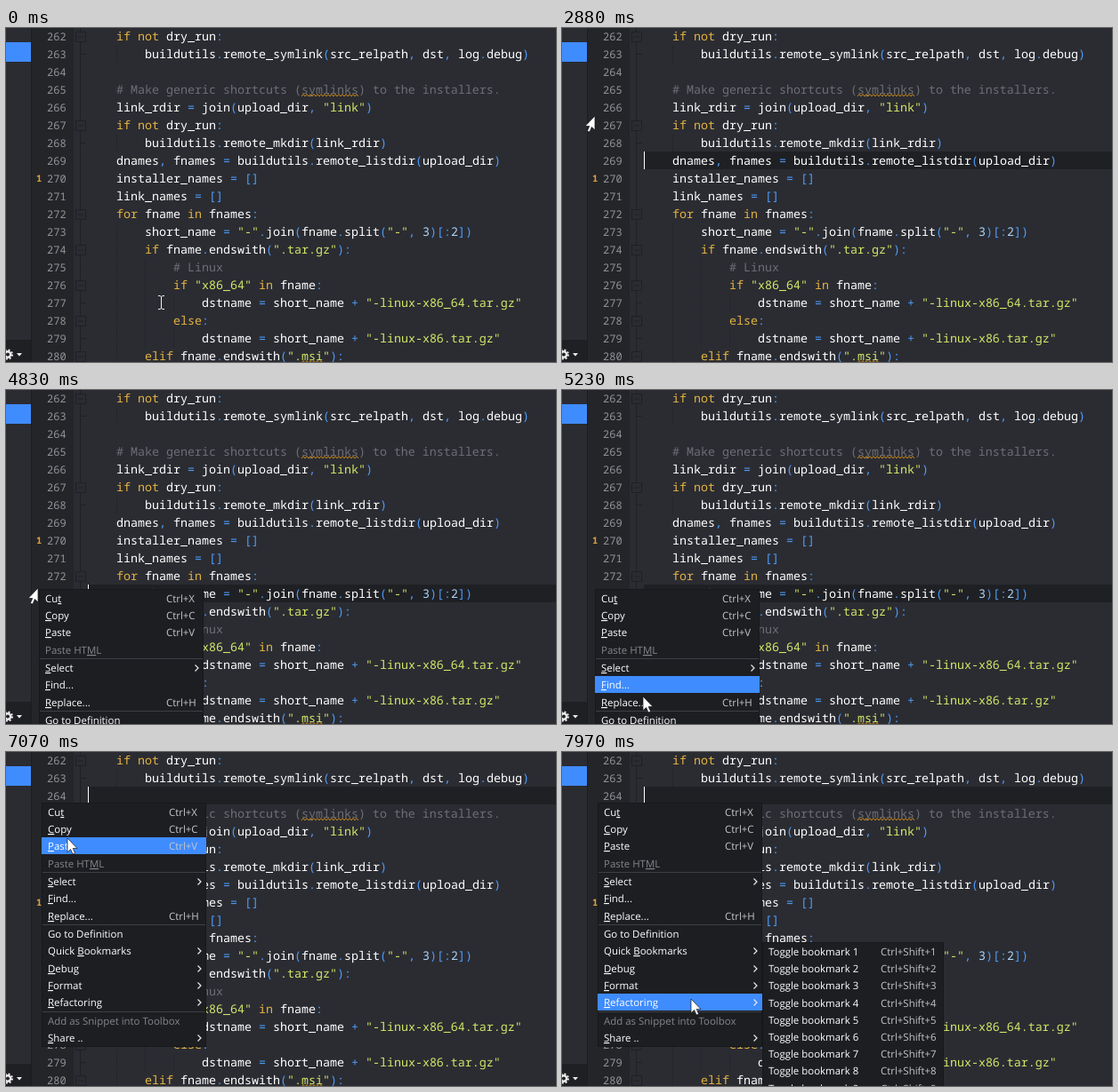
Write an HTML page that moves like this. It is 618 px wide and 376 px high and loops after 8000 ms.

```html
<!DOCTYPE html>
<html lang="en">
<head>
<meta charset="utf-8">
<title>Code editor</title>
<style>
html, body { margin: 0; width: 100%; height: 100%; overflow: hidden; background: #2b2c32; }
svg { display: block; width: 618px; height: 376px; }
text { white-space: pre; text-rendering: geometricPrecision; }
.code { font: 13.3333px "Noto Sans Mono", monospace; fill: #fff; }
.num { font-size: 12px; fill: #929398; }
.kw { fill: #e3b341; }
.op { fill: #4d9dfb; }
.str { fill: #d3e667; }
.int { fill: #a9d4fb; }
.com { fill: #6c6e75; }
.ui { font: 11.45px "Open Sans", "Noto Sans", sans-serif; fill: #fff; }
.key { fill: #c6c6ca; }
.off { fill: #85858b; }
.u { text-decoration: underline; }
.fold { fill: none; stroke: #1f2024; }
.wave { fill: none; stroke: #c58a1c; }
</style>
</head>
<body>
<svg id="stage" viewBox="0 0 618 376"></svg>
<script>
const LOOP = 8000, TICK = 130;
const LEFT = 92, CHAR = 8, LINE = 20, FIRST = 262;
const ROW = 19.2, RULE = 1.4;
const stage = document.getElementById('stage');

function add(parent, tag, attrs = {}, text) {
  const el = document.createElementNS('http://www.w3.org/2000/svg', tag);
  for (const k in attrs) el.setAttribute(k, attrs[k]);
  if (text !== undefined) el.textContent = text;
  parent.appendChild(el);
  return el;
}
const rect = (p, x, y, width, height, fill) => add(p, 'rect', { x, y, width, height, fill });
const path = (p, d, attrs) => add(p, 'path', { d, ...attrs });
const show = (el, on) => { el.style.display = on ? '' : 'none'; };
const place = (el, x, y, extra = '') => el.setAttribute('transform', `translate(${x} ${y})${extra}`);

const CODE = `    if not dry_run:
        buildutils.remote_symlink(src_relpath, dst, log.debug)

    # Make generic shortcuts (symlinks) to the installers.
    link_rdir = join(upload_dir, "link")
    if not dry_run:
        buildutils.remote_mkdir(link_rdir)
    dnames, fnames = buildutils.remote_listdir(upload_dir)
    installer_names = []
    link_names = []
    for fname in fnames:
        short_name = "-".join(fname.split("-", 3)[:2])
        if fname.endswith(".tar.gz"):
            # Linux
            if "x86_64" in fname:
                dstname = short_name + "-linux-x86_64.tar.gz"
            else:
                dstname = short_name + "-linux-x86.tar.gz"
        elif fname.endswith(".msi"):`.split('\n');

const TOKEN = /(#.*)|("[^"]*")|\b(if|not|for|in|else|elif)\b|\b(\d+)\b|([()[\].,:=+]+)|(\w+|\s+)/g;
const CLASSES = ['com', 'str', 'kw', 'int', 'op', ''];

// Side panel, margin and text area
rect(stage, 0, 0, 618, 376, '#2b2c32');
rect(stage, 0, 16, 28, 22, '#3f8cff');
rect(stage, 0, 351, 28, 25, '#1f2024');
rect(stage, 28, 0, 48, 376, '#242529');
rect(stage, 28, 0, 1, 376, '#1c1d20');
const current = rect(stage, LEFT, 0, 526, LINE, '#1f2024');

path(stage, 'M83.5 0V376', { class: 'fold' });
const indentOf = line => line.search(/\S/);

function drawLine(line, i) {
  const top = i * LINE, indent = indentOf(line);
  const next = CODE.slice(i + 1).find(l => l);
  if (line.endsWith(':'))
    path(stage, `M78.5 ${top + 4.5}h11v11h-11zM81 ${top + 10}h6`, { class: 'fold', style: 'fill:#2b2c32' });
  else if (next && indentOf(next) < indent)
    path(stage, `M84 ${top + 9.5}h6`, { class: 'fold' });
  for (let c = 4; c < indent; c += 4)
    path(stage, `M${LEFT + c * CHAR + .5} ${top}v${LINE}`, { class: 'fold', 'stroke-dasharray': '1 1' });

  add(stage, 'text', { class: 'code num', x: 46, y: top + 14 }, FIRST + i);
  const row = add(stage, 'text', { class: 'code', x: LEFT, y: top + 14 });
  for (const m of line.matchAll(TOKEN))
    add(row, 'tspan', { class: CLASSES[m.slice(1).findIndex(g => g !== undefined)] }, m[0]);

  // Spelling marks
  for (const word of ['symlinks', 'msi']) {
    const col = line.search(new RegExp(`\\b${word}\\b`));
    if (col >= 0)
      path(stage, `M${LEFT + col * CHAR} ${top + 17}` + 'l2 -2.5l2 2.5'.repeat(word.length * 2), { class: 'wave' });
  }
}
CODE.forEach(drawLine);

add(stage, 'text', { x: 34, y: 172.5, fill: '#dca23a', style: 'font:bold 10.5px "Noto Sans Mono",monospace' }, '1');

// Settings button
const ring = { cx: 2, cy: 367.5, fill: 'none', stroke: '#eee' };
add(stage, 'circle', { ...ring, r: 3.2, 'stroke-width': 2.4 });
add(stage, 'circle', { ...ring, r: 5, 'stroke-width': 2, 'stroke-dasharray': '1.96 1.96' });
path(stage, 'M12 366h6l-3 3.4z', { fill: '#eee' });

const caret = rect(stage, LEFT, 0, 1, LINE, '#fff');

// "_" marks the access key, "-" a rule, "~" a disabled entry, ">" a submenu
function makeMenu(width, keyX, entries) {
  const g = add(stage, 'g'), rows = [];
  const box = rect(g, .5, .5, width - 1, 0, '#1d1e22');
  box.setAttribute('stroke', '#17181b');
  const bar = rect(g, 0, 0, width, 19, '#3f8cff');
  let y = RULE;
  for (const entry of entries) {
    if (entry === '-') {
      rect(g, 1, Math.round(y), width - 2, 1, '#3e3f44');
      y += RULE;
      continue;
    }
    const [label, key] = entry.split('|');
    const off = label[0] === '~', base = Math.round(y + ROW / 2 + 4);
    const [before, after] = label.replace('~', '').split('_');
    const text = add(g, 'text', { class: off ? 'ui off' : 'ui', x: 7, y: base });
    add(text, 'tspan', {}, before);
    if (after) {
      add(text, 'tspan', { class: 'u' }, after[0]);
      add(text, 'tspan', {}, after.slice(1));
    }
    if (key === '>')
      path(g, `M${width - 9.5} ${base - 7.5}l3.5 3.5l-3.5 3.5`, { fill: 'none', stroke: '#e8e8e8', 'stroke-width': 1.2 });
    else if (key)
      add(g, 'text', { class: 'ui key', x: keyX, y: base }, key);
    rows.push(y);
    y += ROW;
  }
  box.setAttribute('height', Math.round(y));
  return { g, bar, rows, width };
}

const menu = makeMenu(185, 143, ['Cu_t|Ctrl+X', '_Copy|Ctrl+C', '_Paste|Ctrl+V', '~Paste HT_ML', '-',
  '_Select|>', '_Find...', '_Replace...|Ctrl+H', '-',
  'Go to Definition', 'Quick _Bookmarks|>', '_Debug|>', '_Format|>', '_Refactoring|>', '-',
  '~Add as Snippet into Toolbox', '_Share ..|>']);
const marks = makeMenu(204, 133, Array.from({ length: 9 }, (_, i) => `Toggle bookmark ${i + 1}|Ctrl+Shift+${i + 1}`));
place(marks.g, 225, 214);
show(marks.bar, false);

const beam = path(stage, 'M-3 -7.5H-1L.5 -6.5L2 -7.5H4M.5 -6.5V6.5M-3 7.5H-1L.5 6.5L2 7.5H4',
  { fill: 'none', stroke: '#f0f0f0' });
const arrow = path(stage, 'M0 0V15.8L3.6 12.5L6 18L8.6 16.9L6.2 11.5H11Z',
  { fill: '#fff', stroke: '#15161a', 'stroke-width': .7 });

// Each glide eases the pointer from where it rests to a new point
const HOME = { x: 174, y: 309 };
const GLIDES = [
  { from: 20, to: 720, x: 36, y: 124 },
  { from: 1000, to: 1550, x: 35, y: 134 },
  { from: 1670, to: 1920, x: 36, y: 141 },
  { from: 1960, to: 2210, x: 37, y: 120 },
  { from: 2500, to: 3640, x: 37, y: 88 },
  { from: 3640, to: 4710, x: 36, y: 223 },
  { from: 4830, to: 5330, x: 92, y: 348 },
  { from: 5750, to: 6360, x: 46, y: 64 },
  { from: 6390, to: 6650, x: 40, y: 57 },
  { from: 6880, to: 6960, x: 69, y: 97 },
  { from: 7140, to: 7530, x: 128, y: 226 },
  { from: 7660, to: 7900, x: 145, y: 278 }
];
const CLICKS = [{ at: 1680, line: 269 }, { at: 4560, line: 273 }, { at: 6630, line: 264 }];
const MENUS = [{ from: 4830, to: 6500, x: 37, y: 224 }, { from: 6770, to: LOOP, x: 40, y: 57 }];
const SUBMENU_AT = 7660, BLINK = 530, HOVER_LAG = 50;

const easeOut = u => 1 - (1 - u) ** 3;

function pointer(t) {
  let { x, y } = HOME;
  for (const g of GLIDES) {
    if (t <= g.from) break;
    const k = easeOut(Math.min(1, (t - g.from) / (g.to - g.from)));
    x += (g.x - x) * k;
    y += (g.y - y) * k;
  }
  return { x, y };
}

function draw(t) {
  // The pointer is seen in steps, like a screen recording
  const tick = Math.floor((t + 10) / TICK) * TICK - 10;
  const { x, y } = pointer(tick);

  const click = CLICKS.filter(c => c.at <= t).pop();
  show(current, click);
  show(caret, click && (t - click.at) % (2 * BLINK) < BLINK);
  if (click) {
    const top = (click.line - FIRST) * LINE - 1;
    current.setAttribute('y', top);
    caret.setAttribute('y', top);
  }

  const open = MENUS.find(m => t >= m.from && t < m.to);
  const over = p => open && p.x > open.x && p.x < open.x + menu.width && p.y > open.y;
  const hover = pointer(tick - HOVER_LAG);
  const inside = over({ x, y });
  let row = -1;
  if (open) {
    place(menu.g, open.x, open.y);
    if (inside && over(hover))
      row = menu.rows.findIndex(r => hover.y - open.y >= r && hover.y - open.y < r + ROW);
    if (row >= 0) menu.bar.setAttribute('y', Math.floor(menu.rows[row]));
  }
  show(menu.g, open);
  show(menu.bar, row >= 0);
  show(marks.g, t >= SUBMENU_AT);

  const inText = !inside && x >= LEFT;
  show(beam, inText);
  show(arrow, !inText);
  place(beam, Math.round(x), Math.round(y));
  place(arrow, Math.round(x), Math.round(y), inside ? '' : ' scale(-1 1)');
}

const start = performance.now();
function frame() {
  draw((performance.now() - start) % LOOP);
  requestAnimationFrame(frame);
}
draw(0);
requestAnimationFrame(frame);
</script>
</body>
</html>
```
